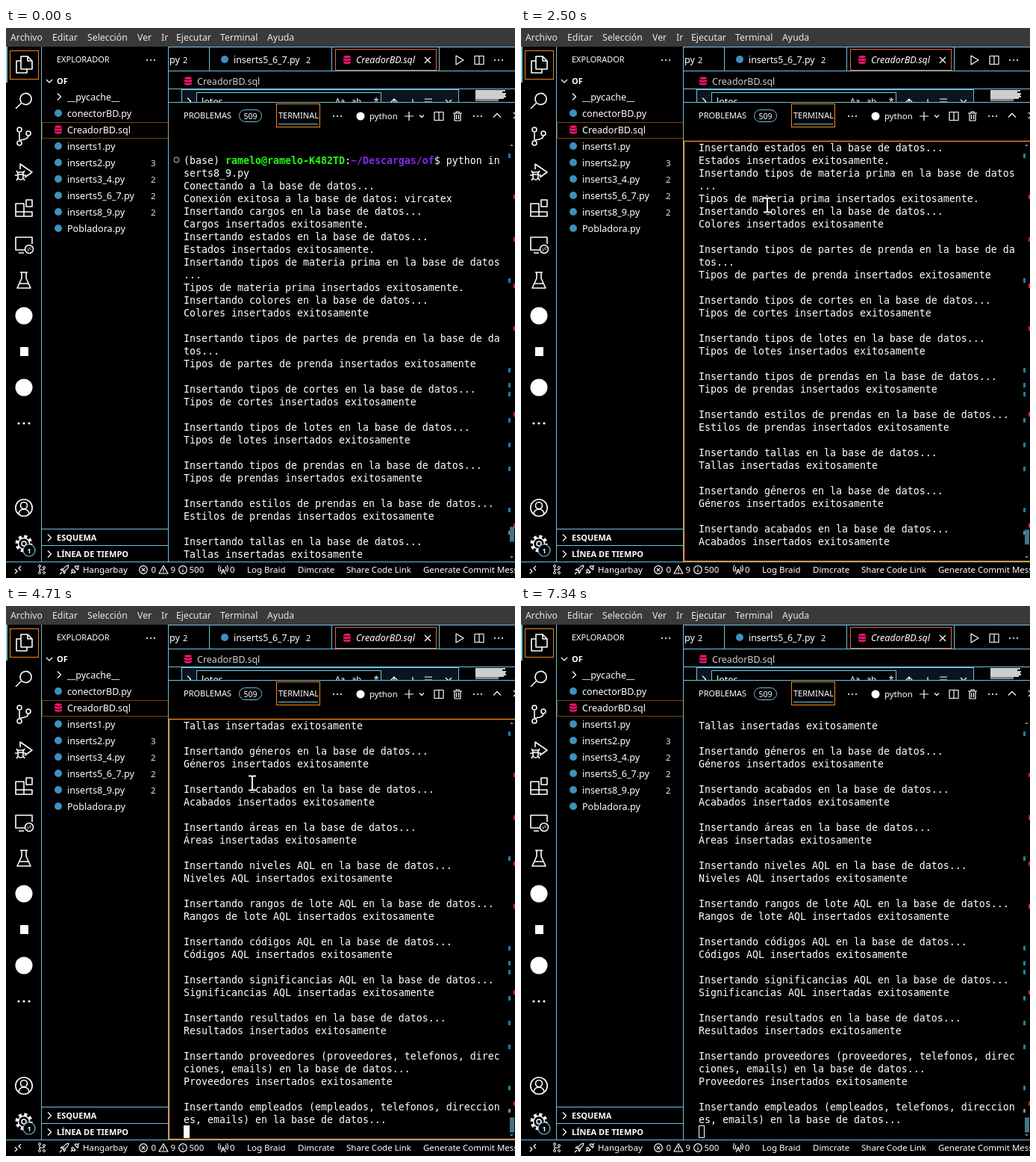
These frames come from a looping animation (682x736 px, 7380 ms). An HTML page:

```html
<!DOCTYPE html>
<html lang="es">
<head>
<meta charset="utf-8">
<title>Terminal</title>
<style>
  html, body { margin: 0; width: 100%; height: 100%; overflow: hidden; background: #000; }
  svg { display: block; width: 682px; height: 736px; font-family: "Noto Sans", "Open Sans", sans-serif; }
  text { white-space: pre; }
  .mono { font-family: "DejaVu Sans Mono", monospace; font-size: 13.29px; }
</style>
</head>
<body>
<svg id="stage" viewBox="0 0 682 736" xmlns="http://www.w3.org/2000/svg"></svg>
<script>
const LOOP = 7380, ROW = 17, COLS = 53;
const INK = '#ffffff', EDGE = '#6fc3df', ORANGE = '#f38518', RED = '#f5146e', BLUE = '#3e8fbe', MUTED = '#d0d0d0';
const stage = document.getElementById('stage');
let out = [];

const attrs = o => Object.entries(o).map(([k, v]) => `${k}="${v}"`).join(' ');
const tag = (name, o, body = '') => out.push(`<${name} ${attrs(o)}>${body}</${name}>`);
const text = (x, y, s, size = 12.6, o = {}) => tag('text', { x, y, 'font-size': size, fill: INK, ...o }, s);
const path = (d, o = {}) => tag('path', { d, fill: 'none', stroke: INK, 'stroke-width': 1.2, ...o });
const box = (x, y, width, height, o = {}) => tag('rect', { x, y, width, height, fill: 'none', ...o });
const frame = (x, y, w, h, stroke, inside = 'none') => box(x + .5, y + .5, w, h, { stroke, fill: inside });
const fill = (x, y, w, h, color) => box(x, y, w, h, { fill: color });
const disc = (cx, cy, r, color = INK) => tag('circle', { cx, cy, r, fill: color });
const ring = (cx, cy, r, o = {}) => tag('circle', { cx, cy, r, fill: 'none', stroke: INK, 'stroke-width': 1.2, ...o });
const line = (x1, y1, x2, y2, stroke = EDGE) => path(`M${x1} ${y1}L${x2} ${y2}`, { stroke, 'stroke-width': 1 });
const icon = (x, y, d, w = 1.6) => path(d, { transform: `translate(${x} ${y})`, 'stroke-width': w, 'stroke-linejoin': 'round' });
const dots = (x, y, gap = 5, r = 1.1) => [-gap, 0, gap].forEach(d => disc(x + d, y, r));
const cross = (x, y, r = 4) => icon(x, y, `M${-r} ${-r}L${r} ${r}M${r} ${-r}L${-r} ${r}`, 1.2);
const right = (x, y) => icon(x, y, 'M-2 -4.5L2.5 0L-2 4.5', 1.2);
const down = (x, y, r = 4) => icon(x, y, `M${-r} ${-r / 2}L0 ${r / 2}L${r} ${-r / 2}`, 1.2);
const split = (x, y) => icon(x, y, 'M-6 -5.5H6V5.5H-6ZM0 -5.5V5.5', 1.2);

function database(x, y) {
  box(x - 5, y - 5.5, 10, 11, { fill: RED, rx: 3 });
  for (const dy of [-2, 2]) path(`M${x - 5} ${y + dy - .5}q5 2 10 0`, { stroke: '#000', 'stroke-width': 1 });
}

function menuBar() {
  fill(0, 0, 682, 25, '#3a3a3a');
  [[6, 'Archivo'], [62, 'Editar'], [109, 'Selección'], [176, 'Ver'], [208, 'Ir'],
   [228, 'Ejecutar'], [287, 'Terminal'], [350, 'Ayuda']]
    .forEach(([x, s]) => text(x, 17, s, 12.3, { fill: '#e8e8e8' }));
}

function activityBar() {
  line(47.5, 25, 47.5, 714);
  fill(0, 25, 2, 48, EDGE);
  frame(5, 30, 38, 38, ORANGE);
  icon(24, 49, 'M-4 -11H5L11 -5V6H-4ZM5 -11V-5H11M-4 -5H-10V11H4V6');
  icon(24, 97, 'M-3 3L-11 11M-3 3A7.5 7.5 0 1 1 -2.5 3.5');
  icon(24, 145, 'M-6 -5V5M6 -1Q6 4 -5 5');
  [[18, 136], [18, 154], [30, 141]].forEach(p => ring(...p, 3, { 'stroke-width': 1.6 }));
  icon(24, 193, 'M-5 -4V-11L11 0L1 7M-10 -2L-8 1M1 -2L-1 1M-12 4H-8M3 4H-1M-10 11L-8 8M1 11L-1 8M-8 0H-1V6A3.5 4 0 0 1 -8 6ZM-8 3H-1');
  icon(24, 241, 'M-11 -6H0V5H11V11H-11ZM-11 5H0V11M3 -11H11V-2H3Z');
  icon(24, 290, 'M1 7H-11V-10H11V-1M-7 11H0');
  ring(31, 296, 5.5, { 'stroke-width': 1.5 });
  icon(31, 296, 'M-2.5 -1L-.5 1L-2.5 3M2.5 -3L.5 -1L2.5 1', 1);
  icon(24, 338, 'M-5 -11H5M-3 -11V-3L-9 10H9L3 -3V-11M-6 4H6');
  disc(24, 385, 11.5);
  fill(19, 427, 11, 12, INK);
  disc(24, 481, 11.5);
  dots(24, 529, 7, 1.6);
  ring(24, 642, 11.2, { 'stroke-width': 1.6 });
  ring(24, 639, 4.5, { 'stroke-width': 1.6 });
  icon(24, 642, 'M-7 8Q-6 2 0 2Q6 2 7 8');
  ring(24, 690, 9.5, { 'stroke-width': 4, 'stroke-dasharray': '4 3.46' });
  ring(24, 690, 7.5, { 'stroke-width': 1.5 });
  ring(24, 690, 3, { 'stroke-width': 1.5 });
  ring(31, 699, 8, { fill: '#000', stroke: EDGE });
  text(31, 702.5, '1', 9, { 'text-anchor': 'middle', 'font-weight': 700 });
}

function sideBar() {
  line(217.5, 25, 217.5, 714);
  text(68, 46, 'EXPLORADOR', 11);
  dots(194, 43);
  down(58, 71);
  text(68, 75, 'OF', 11, { 'font-weight': 700 });
  right(71, 92);
  const files = ['__pycache__', 'conectorBD.py', 'CreadorBD.sql', 'inserts1.py', 'inserts2.py 3',
    'inserts3_4.py 2', 'inserts5_6_7.py 2', 'inserts8_9.py 2', 'Pobladora.py'];
  files.forEach((entry, i) => {
    const y = 92 + 22 * i, [name, count] = entry.split(' ');
    text(82, y + 4.5, name);
    if (name.endsWith('.py')) disc(70, y, 5, BLUE);
    if (name.endsWith('.sql')) database(70, y);
    if (count) text(194, y + 5, count, 11.5, { fill: '#e8e8e8' });
  });
  box(48.5, 126.5, 169, 21, { stroke: ORANGE, 'stroke-dasharray': '1 1' });
  [[670.5, 'ESQUEMA'], [692.5, 'LÍNEA DE TIEMPO']].forEach(([y, s]) => {
    line(48, y, 217, y);
    right(58, y + 11.5);
    text(68, y + 15.5, s, 11, { 'font-weight': 700 });
  });
}

function editor() {
  line(218, 25.5, 682, 25.5);
  line(218, 57.5, 682, 57.5);
  [272.5, 436.5, 580.5].forEach(x => line(x, 25, x, 57));
  text(219, 46.5, 'py');
  text(237, 46.5, '2', 11);
  disc(293, 42, 5, BLUE);
  text(305, 46.5, 'inserts5_6_7.py', 12.4);
  text(402, 46.5, '2', 11);
  frame(441, 28, 135, 28, '#e8633c');
  database(457, 42.5);
  text(469, 46.5, 'CreadorBD.sql', 12.5, { 'font-style': 'italic' });
  cross(565, 43);
  icon(607, 43, 'M-4 -6L6 0L-4 6Z', 1.2);
  split(634, 43);
  dots(660, 43);
  database(244, 71);
  text(256, 75.5, 'CreadorBD.sql', 12.5, { fill: MUTED });
  line(218, 81.5, 682, 81.5);

  out.push('<g clip-path="url(#editorClip)">');
  frame(235, 82, 371, 40, EDGE, '#0c141f');
  frame(255, 86, 247, 24, EDGE, '#000');
  right(245, 98);
  text(262, 103, 'lotes', 12.6);
  text(441, 102, 'Aa', 11);
  text(463, 102, 'ab', 11);
  text(489, 103, '.*', 13);
  icon(520, 100, 'M-5 0L0 -5L5 0M0 -5V5', 1.2);
  icon(545, 100, 'M-5 0L0 5L5 0M0 -5V5', 1.2);
  icon(566, 98, 'M-5 -3H5M-5 1H5', 1.2);
  cross(593, 100);
  [[40, 83], [36, 85], [41, 87], [40, 89], [41, 91], [38, 93]].forEach(([w, y]) => fill(629, y, w, 1.8, '#e4e4e4'));
  fill(629, 95, 31, 3, '#8a8a8a');
  out.push('</g>');
}

function panelHeader() {
  line(218, 99.5, 682, 99.5);
  text(238, 121, 'PROBLEMAS', 11);
  box(312.5, 109.5, 30, 16, { rx: 8, stroke: EDGE });
  text(327.5, 121.5, '509', 10.5, { 'text-anchor': 'middle' });
  frame(362, 101, 58, 31, ORANGE);
  text(365, 121, 'TERMINAL', 11);
  line(365, 128.5, 418, 128.5);
  dots(444, 118);
  disc(475, 118, 5.5);
  text(487, 121.5, 'python', 11.4);
  icon(540, 118, 'M-6 0H6M0 -6V6', 1.2);
  down(557, 118, 3);
  split(580, 118);
  icon(605, 118, 'M-6 -4H6M-2 -4V-6H2V-4M-4 -4V6H4V-4M-1.5 -2V4M1.5 -2V4', 1.2);
  dots(632, 118);
  icon(658, 117, 'M-5 2.5L0 -2.5L5 2.5', 1.2);
  cross(684, 117);
}

function statusBar() {
  line(0, 714.5, 682, 714.5);
  const label = (x, s) => text(x, 729, s, 11.5);
  icon(16, 725, 'M-4 -1L-1 2L-4 5M4 -5L1 -2L4 1', 1.2);
  icon(48, 725, 'M-3 -3V3M-3 0H3V-1M3 2V3', 1.1);
  [[45, 720], [45, 729], [51, 722], [51, 729]].forEach(p => ring(...p, 1.5, { 'stroke-width': 1 }));
  icon(78, 725, 'M-2 1Q0 -5 6 -6Q5 0 -1 2ZM-2 -2L-5 0L-2 1M2 2L0 5L-1 2M-3 3L-6 6', 1.2);
  icon(92, 725, 'M-5 5L-3 3M-3 -1L1 3Q-1 5 -3 3Q-5 1 -3 -1M0 -4L4 0Q6 -2 4 -4Q2 -6 0 -4M4 -4L6 -6', 1.2);
  label(103, 'Hangarbay');
  ring(184, 725, 5.3);
  cross(184, 725, 2.2);
  label(194.5, '0');
  icon(211, 725, 'M0 -5.5L6 5H-6ZM0 -2V2M0 3V4', 1.2);
  label(220.5, '9');
  ring(237, 725, 5.3);
  icon(237, 725, 'M0 -3V-2M0 -.5V3', 1.2);
  label(245.5, '500');
  icon(291, 725, 'M0 -1L-3 6M0 -1L3 6M-2 3H2M-3 -4Q-5 -1 -3 2M3 -4Q5 -1 3 2M-5 -6Q-8 -1 -5 3M5 -6Q8 -1 5 3', 1.1);
  label(300, '0');
  label(323, 'Log Braid');
  label(391, 'Dimcrate');
  label(456, 'Share Code Link');
  label(559, 'Generate Commit Message');
}

function terminalLines() {
  const lines = ['', null, 'serts8_9.py'];
  const print = s => { do { lines.push(s.slice(0, COLS)); s = s.slice(COLS); } while (s); };
  const contact = ', telefonos, direcciones, emails)';
  const insert = (what, extra = '') => print(`Insertando ${what}${extra} en la base de datos...`);
  const done = (what, end = '') => {
    const gender = /^(tallas|áreas|signif)/.test(what) ? 'a' : 'o';
    print(`${what[0].toUpperCase()}${what.slice(1)} insertad${gender}s exitosamente${end}`);
  };
  print('Conectando a la base de datos...');
  print('Conexión exitosa a la base de datos: vircatex');
  for (const what of ['cargos', 'estados', 'tipos de materia prima']) { insert(what); done(what, '.'); }
  for (const what of ['colores', 'tipos de partes de prenda', 'tipos de cortes', 'tipos de lotes',
    'tipos de prendas', 'estilos de prendas', 'tallas', 'géneros', 'acabados', 'áreas', 'niveles AQL',
    'rangos de lote AQL', 'códigos AQL', 'significancias AQL', 'resultados', 'proveedores']) {
    insert(what, what === 'proveedores' ? ` (${what}${contact}` : '');
    done(what);
    print('');
  }
  insert('empleados', ` (empleados${contact}`);
  return lines;
}

function terminal() {
  const lines = terminalLines();
  const span = (s, color) => `<tspan fill="${color}" font-weight="700">${s}</tspan>`;
  const prompt = '(base) ' + span('ramelo@ramelo-K482TD', '#22ff14') + ':' +
    span('~/Descargas/of', '#7c2ce8') + '$ python in';
  out.push('<g clip-path="url(#termClip)"><g id="scroll">');
  ring(228.5, 176.5, 3.4, { stroke: '#9a9a9a' });
  lines.forEach((s, i) => {
    if (s !== '') tag('text', { x: 238, y: 165 + ROW * i, class: 'mono', fill: INK }, s ?? prompt);
  });
  box(238.5, 152 + ROW * lines.length - .5, 7, 16, { id: 'caret', stroke: INK });
  out.push('</g></g>');

  [171, 338, 458, 478, 490, 525, 558, 590, 645].forEach(y => fill(673, y - 3, 3, 6, '#1b81a8'));
  [226, 283, 345, 402, 517, 666].forEach(y => fill(680, y - 3, 2, 6, '#f01818'));
  fill(673, 673, 3, 5, '#848484');
  path('M675 158L677.5 155.5L680 158Z', { fill: '#8a8a8a', stroke: 'none' });
  path('M675 707L677.5 709.5L680 707Z', { fill: '#8a8a8a', stroke: 'none' });
  box(675, 0, 6, 20, { id: 'slider' });
  box(218.5, 151.5, 464.5, 562, { id: 'focus', stroke: ORANGE, 'stroke-width': 1.4 });
}

function pointers() {
  out.push('<g id="mouse">');
  path('M0 0V20L5.5 15.5L16.5 14Z', { id: 'arrow', fill: '#000', 'stroke-width': 1.7, 'stroke-linejoin': 'round' });
  out.push('<g id="beam">');
  const shape = 'M-5 -9.5H-2Q0 -9.5 0 -7.5Q0 -9.5 2 -9.5H5M0 -8V8M-5 9.5H-2Q0 9.5 0 7.5Q0 9.5 2 9.5H5';
  path(shape, { stroke: '#000', 'stroke-width': 4.5 });
  path(shape, { 'stroke-width': 2 });
  out.push('</g></g>');
}

out.push('<defs><clipPath id="editorClip"><rect x="218" y="82" width="464" height="17"/></clipPath>' +
  '<clipPath id="termClip"><rect x="219" y="152" width="454" height="561"/></clipPath></defs>');
fill(0, 0, 682, 736, '#000');
[menuBar, activityBar, sideBar, editor, panelHeader, statusBar, terminal, pointers].forEach(draw => draw());
stage.innerHTML = out.join('');

const [scroll, caret, slider, focus, mouse, arrow, beam] =
  ['scroll', 'caret', 'slider', 'focus', 'mouse', 'arrow', 'beam'].map(id => document.getElementById(id));
const show = (el, on) => el.setAttribute('display', on ? 'inline' : 'none');

const wheelTicks = [2250, 2900, 3400, 3900, 4350];
const route = [[600, 690, 678], [1300, 235, 367], [1450, 235, 367], [1950, 330, 237], [6900, 330, 237], [7180, 700, 300]];

function mouseAt(t) {
  const i = route.findIndex(p => p[0] > t);
  if (i < 1) return null;
  const [a, b] = [route[i - 1], route[i]];
  const u = (t - a[0]) / (b[0] - a[0]), k = u * u * (3 - 2 * u);
  return [a[1] + (b[1] - a[1]) * k, a[2] + (b[2] - a[2]) * k];
}

function render(t) {
  const offset = Math.min(32, 7 * wheelTicks.filter(tick => tick <= t).length);
  const focused = t >= 600 && t < 7200, dragging = t >= 600 && t < 1600;
  scroll.setAttribute('transform', `translate(0 ${-ROW * offset})`);
  slider.setAttribute('y', 667.5 + offset * 17 / 32);
  slider.setAttribute('fill', dragging ? EDGE : '#437586');
  caret.setAttribute('fill', focused ? INK : 'none');
  show(focus, focused);
  const at = mouseAt(t);
  show(mouse, at);
  show(arrow, dragging);
  show(beam, !dragging);
  if (at) mouse.setAttribute('transform', `translate(${at[0]} ${at[1]})`);
}

const start = performance.now();
function tick() {
  render((performance.now() - start) % LOOP);
  requestAnimationFrame(tick);
}
render(0);
requestAnimationFrame(tick);
</script>
</body>
</html>
```
